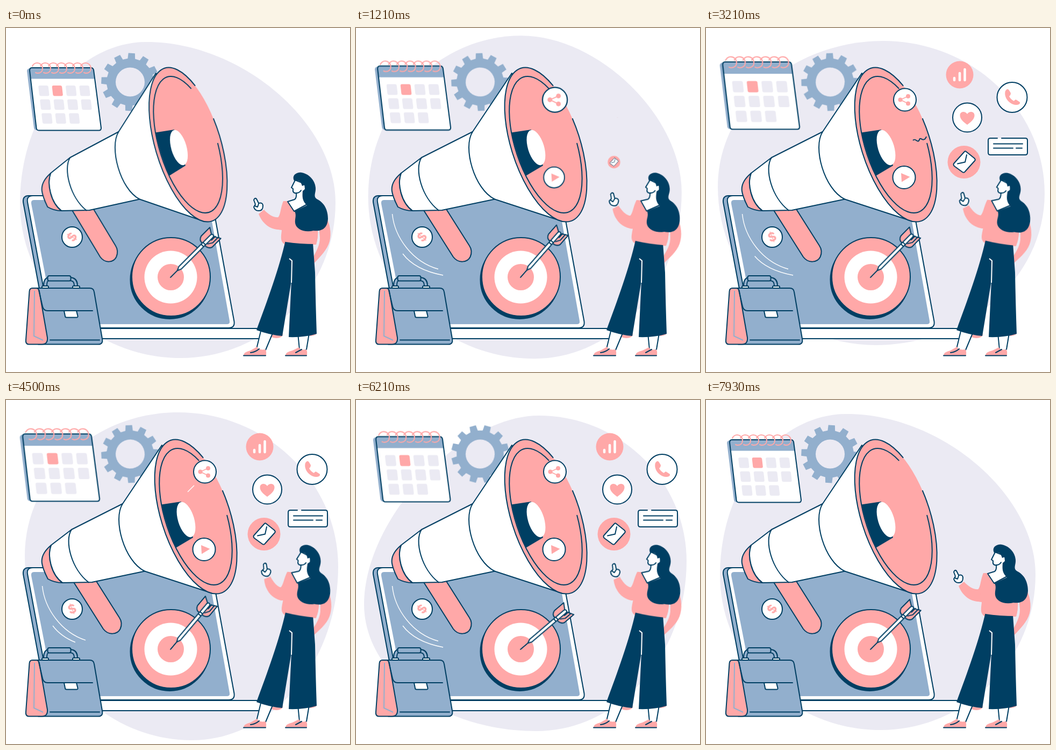
These frames come from a looping animation (640 px wide and 640 px high, 8 s). An HTML page:

```html
<!DOCTYPE html>
<html lang="en">
<head>
<meta charset="utf-8">
<title>Marketing campaign</title>
<style>
  html, body { margin: 0; width: 100%; height: 100%; overflow: hidden; background: #fff; }
  svg { display: block; width: 100%; height: 100%; }
  .n { stroke: #003f63; stroke-width: 2; stroke-linejoin: round; stroke-linecap: round; }
  .w { fill: #fff; } .p { fill: #ffa8a8; } .b { fill: #92afcd; } .d { fill: #003f63; }
  .l { fill: #ebeaf3; } .o { fill: none; }
  .anim, .pop, .dash { animation: 8s ease-in-out infinite both; }

  #calendar { transform-origin: 217px 219px; animation-name: grow; }
  @keyframes grow { 0%, 99%, 100% { transform: none; } 40%, 58% { transform: scale(1.075); } }

  #gear { transform-origin: 231px 100.5px; animation-name: spin; animation-timing-function: linear; }
  @keyframes spin { 99.1%, 100% { transform: rotate(360deg); } }

  #horn { transform-origin: 67px 0; animation-name: stretch; }
  @keyframes stretch { 0% { transform: scaleX(.95); } 16%, 100% { transform: none; } }

  #dart { transform-origin: 306px 464px; animation-name: sway; }
  @keyframes sway {
    0%, 100% { transform: none; }
    10.6% { transform: rotate(-5deg); }
    27% { transform: rotate(3.5deg); }
    54.5% { transform: rotate(-5deg); }
    78% { transform: rotate(4.6deg); }
  }

  #coin { transform-origin: 123px 389px; animation-name: roll; }
  @keyframes roll {
    0%, 100% { transform: rotate(-60deg); }
    40%, 56% { transform: rotate(-22deg); }
    78% { transform: rotate(-56deg); }
  }

  .lean { transform-origin: 545px 400px; animation-name: lean; }
  @keyframes lean { 0%, 4%, 97%, 100% { transform: none; } 20%, 80% { transform: rotate(5.4deg); } }

  #forearm { transform-origin: 505px 365px; animation-name: wave; }
  @keyframes wave {
    0%, 4%, 97%, 100% { transform: none; }
    20%, 78% { transform: rotate(9deg); }
    40% { transform: rotate(6deg); }
    56% { transform: rotate(11deg); }
  }

  .pop { transform-box: fill-box; transform-origin: center; animation-name: pop; animation-delay: var(--d); }
  @keyframes pop {
    0%, 11% { transform: scale(0); }
    15% { transform: scale(1.1); }
    17%, 84% { transform: none; }
    88%, 100% { transform: scale(0); }
  }

  .dash { fill: none; stroke-dasharray: 1 3; animation-timing-function: linear; stroke-linecap: butt; }
  .white { stroke: #fff; stroke-width: 1.4; }
  #glow1 { animation-name: glow1; }
  #glow2 { animation-name: glow2; }
  #spark { animation-name: spark; }
  #buzz { animation-name: buzz; }
  @keyframes glow1 {
    0%, 2% { stroke-dashoffset: 1; } 8%, 41% { stroke-dashoffset: 0; }
    47% { stroke-dashoffset: -1; } 47.01%, 50% { stroke-dashoffset: 1; }
    56.2% { stroke-dashoffset: .04; } 57%, 82% { stroke-dashoffset: 0; }
    92%, 100% { stroke-dashoffset: -1; }
  }
  @keyframes glow2 {
    0%, 3% { stroke-dashoffset: 1; } 8% { stroke-dashoffset: .15; }
    10%, 38% { stroke-dashoffset: 0; } 40.1% { stroke-dashoffset: -.06; }
    46% { stroke-dashoffset: -1; } 46.01%, 50% { stroke-dashoffset: 1; }
    56.2% { stroke-dashoffset: .4; } 61%, 82% { stroke-dashoffset: 0; }
    92%, 100% { stroke-dashoffset: -1; }
  }
  @keyframes spark {
    0%, 7% { stroke-dashoffset: 1; } 8% { stroke-dashoffset: .68; }
    10% { stroke-dashoffset: 0; } 12% { stroke-dashoffset: -1; }
    12.01%, 53% { stroke-dashoffset: 1; } 56%, 57% { stroke-dashoffset: 0; }
    60%, 100% { stroke-dashoffset: -1; }
  }
  @keyframes buzz {
    0%, 37% { stroke-dashoffset: 1; } 40%, 41% { stroke-dashoffset: 0; }
    44%, 100% { stroke-dashoffset: -1; }
  }
</style>
</head>
<body>
<svg viewBox="0 0 640 640">
  <path id="blob" class="l"/>

  <g id="calendar" class="anim">
    <path class="b" d="M44 75H158L171 190H57Q53 190 52 186L39 80Q39 76 44 75Z"/>
    <path class="w" d="M48 74H158Q162 74 163 78L177 186Q177 190.500 173 190.500H61Q57 190.500 56.500 186L44 79Q44 74 48 74Z"/>
    <path class="b" d="M48 74H158Q162 74 163 78L165 94.500H46L44 79Q44 74 48 74Z"/>
    <path class="n o" d="M48 74H158Q162 74 163 78L177 186Q177 190.500 173 190.500H61Q57 190.500 56.500 186L44 79Q44 74 48 74Z"/>
    <g id="days"></g>
    <g id="rings" fill="none" stroke="#ffa8a8" stroke-width="2" stroke-linecap="round"></g>
  </g>

  <g id="gear" class="anim"><path id="cog" class="b" fill-rule="evenodd"/></g>

  <g id="laptop">
    <path class="n b" d="M42 312H360L405 558H84Q76 558 74 550L32 324Q31 312 42 312Z"/>
    <path class="n w" d="M50 312H373Q381 312 383 320L424.500 546Q426 558 414 558H92Q84 558 82 550L40 324Q38 312 50 312Z"/>
    <path class="b" d="M52 320H371Q376 320 377 326L416 545Q417 551 411 551H96Q91 551 90 546L47 327Q46 320 52 320Z"/>
    <path class="n w" d="M165 559H482V578H165Z"/>
    <path id="glow1" class="dash white" pathLength="1" d="M67.500 346C72 390 105 435 153 448.500"/>
    <path id="glow2" class="dash white" pathLength="1" d="M87 420C102 440 125 453 162 460"/>
  </g>

  <circle class="n w" cx="123" cy="389" r="19"/>
  <g id="coin" class="anim">
    <text x="123" y="397" text-anchor="middle" font-family="Inter, Arial, sans-serif" font-size="23" font-weight="700" class="p">$</text>
  </g>

  <g id="target">
    <circle class="n d" cx="304.500" cy="468" r="73"/>
    <circle class="n p" cx="307" cy="463" r="73"/>
    <circle class="w" cx="306.500" cy="463.500" r="49"/>
    <circle class="p" cx="306.500" cy="463.500" r="24.500"/>
  </g>
  <g id="dart" class="anim">
    <g transform="translate(306 464) rotate(-45)" class="n">
      <path class="p" d="M87 -3C86 -9 90 -13 95 -14L117.500 -14L110 -2Z"/>
      <path class="p" d="M87 3C87 9 90 14 95 15L117.500 15L110 2Z"/>
      <path class="o" d="M93 5L101 10H115M103 5H113"/>
      <path class="o" d="M0 0H20"/>
      <path class="w" d="M18 0L25 -3.200H108Q112 -3 112 0T108 3.200H25Z"/>
      <path class="o" d="M84 -3V3M89 -3V3"/>
    </g>
  </g>

  <g id="horn" class="anim">
    <path class="n p" d="M124 336L181 426C190 438 207 437 212.500 426C216 418 215 411 211 405L166 334Z"/>
    <path class="n w" d="M105 340C84 325 76 290 84 270L122 241L217 193L290 84L373 356L258 318.500L160 339Z"/>
    <path class="n p" d="M84 270C71 281 65 292 67 304C69 316 74 325 78 333C87 338 95 340 105 340C84 325 76 290 84 270Z"/>
    <path class="n o" d="M122 241C108 262 122 315 154 339.500M217 193C198 222 220 300 258 318.500"/>
    <ellipse class="p" cx="353" cy="217" rx="63.700" ry="149.600" transform="rotate(-18.250 353 217)"/>
    <path class="n o" d="M402.900 168.900A63.700 149.600 -18.250 1 1 366.600 107.100M411.200 214.800A56.400 132.400 -18.250 1 1 358.600 112.400"/>
    <path class="d" d="M289 194.500L326 189L348 256L316 275Q300 240 289 194.500Z"/>
    <ellipse class="w" cx="335" cy="222.500" rx="15" ry="34" transform="rotate(-17 335 222.500)"/>
    <path id="spark" class="dash white" pathLength="1" d="M338 171L350 159"/>
    <path id="buzz" class="n dash" pathLength="1" d="M385 209C389 205 391 210 394 210.500C398 211 396 204 400 206C404 209 408 208 410 202"/>
  </g>

  <g id="briefcase">
    <path class="n o" style="stroke-width:8" d="M73 479C73 471 75 467 81 467M118 467C127 467 130 472 130 479"/>
    <path class="o" stroke="#92afcd" stroke-width="4" d="M73 481C73 471 75 467 81 467M118 467C127 467 130 472 130 481"/>
    <rect class="n b" x="77.500" y="461" width="43" height="9.500" rx="3"/>
    <rect class="n w" x="67" y="480" width="12" height="5" rx="1.500"/>
    <rect class="n w" x="124" y="480" width="13" height="5" rx="1.500"/>
    <path class="n b" d="M55 484H156Q163 484 164 491L179 578Q181 588.500 172 588.500H60Z"/>
    <path class="n p" d="M49 484H56Q61 484 62 490L77 576Q78 588.500 67 588.500H42Q36 588 37 580L43.500 490Q44 484 49 484Z"/>
    <path class="o" stroke="#92afcd" stroke-width="2" d="M53 489L52 573L69 581"/>
    <path class="n o" d="M61 488L68 518Q70 526 77 526H161M82 580.500H174"/>
    <path class="n w" d="M108 526H131L133.500 536Q134 538.500 131 538.500H113Q110 538.500 110 536Z"/>
  </g>

  <g class="pop" style="--d:0s">
    <circle class="n w" cx="370" cy="133.500" r="21"/>
    <path class="o" stroke="#ffa8a8" stroke-width="1.800" d="M376 127L361.500 133.500L376 140.500"/>
    <g class="p"><circle cx="361.500" cy="133.500" r="4"/><circle cx="376" cy="127" r="4"/><circle cx="376" cy="140.500" r="4"/></g>
  </g>
  <g class="pop" style="--d:.1s">
    <circle class="n w" cx="368.500" cy="278" r="21"/>
    <path class="p" d="M363 270L379.500 277L364 286.500Z"/>
  </g>
  <g class="pop" style="--d:.2s">
    <circle class="p" cx="480" cy="249.500" r="30.500"/>
    <path class="n w" d="M484 230L499 242Q502 245 500 247L482 267Q480 270 477 268L462 257Q459 254 462 251L480 231Q482 228 484 230Z"/>
    <path class="n o" d="M468 252.500L482 249.500L485 236"/>
  </g>
  <g class="pop" style="--d:.3s">
    <circle class="n w" cx="486" cy="166.500" r="27"/>
    <path class="p" d="M486 180C479 175 472 169 472.500 162C473 155 482 154 486 160C490 154 499 155 499.500 162C500 169 493 175 486 180Z"/>
  </g>
  <g class="pop" style="--d:.35s">
    <path class="n w" d="M550 205H594q4 0 4 4V232q0 4 -4 4H529q-4 0 -4 -4V209q0 -4 4 -4H542"/>
    <path class="n o" d="M535 215.500H589M535 223.500H571M577 223.500H588"/>
  </g>
  <g class="pop" style="--d:.4s">
    <circle class="p" cx="472" cy="87" r="25.500"/>
    <path class="o" stroke="#fff" stroke-width="4.500" stroke-linecap="round" d="M462 93V97M472 84V97M481.500 77V97"/>
  </g>
  <g class="pop" style="--d:.73s">
    <circle class="n w" cx="569.500" cy="129" r="28"/>
    <path class="p" d="M557 117Q561 111 564 116L567 121Q567 125 564 127Q567 133 573 136Q575 132 578 134L584 138Q585 142 579 143C566 144 553 130 557 117Z"/>
  </g>

  <g id="woman">
    <g class="p"><ellipse cx="503" cy="570" rx="12" ry="7"/><ellipse cx="566" cy="567" rx="12" ry="6"/></g>
    <path class="n w" d="M475 560L466 597Q474 604 483 599L496 568Z"/>
    <path class="n w" d="M543 568L546 598Q553 603 559 598L564 568Z"/>
    <g id="shoe">
      <path class="p" d="M442 609Q442 603 455 600L467 593Q469 600 483 598Q485 603 484 609Z"/>
      <path class="n o" d="M442 609.500H483M455 604Q464 603 471 597"/>
    </g>
    <g transform="translate(78)">
      <path class="p" d="M442 609Q442 603 455 600L467 594Q469 600 481 598Q483 603 482 609Z"/>
      <path class="n o" d="M442 609.500H481M461 604L472 598"/>
    </g>
    <g class="anim lean">
      <path class="p" d="M594 348C603 364 606 382 602 397C598 412 585 425 574 437L570 430C577 415 584 405 584 390L582 368Z"/>
      <path class="p" d="M516 322H525L537 341L575 352C581 368 582 385 577 403H520C509 398 512 388 513 376L502 374L505 353C511 350 510 336 516 322Z"/>
    </g>
    <path class="d" d="M520 395L571 400L575 455Q576 510 578 569Q555 576 526 575L531 470L514 573Q490 571 466 562C486 508 509 445 520 395Z"/>
    <path class="o" stroke="#fff" stroke-width="2" d="M527 429L532 433L531 474"/>
    <g class="anim lean">
      <path class="p" d="M514 374H580Q581 390 577 402Q545 402 520 398Q510 394 514 374Z"/>
      <path class="n w" d="M538 283L531 297L534 299V304Q536 308 540 307Q541 316 537 319L524 323L536 341L560 328L556 290Z"/>
      <path class="d" d="M536 284C531 273 542 268 550 269C563 271 575 283 576 297C577 306 571 313 578 318C593 325 599 340 599 355C598 373 587 379 572 377C556 381 540 375 538 363C537 354 541 349 537 341L560 330C551 322 551 314 552 303Q557 300 557 296Q556 290 551 294C549 287 546 283 541 284Z"/>
      <path class="n o" d="M540 307Q546 307 549 302"/>
      <g id="forearm" class="anim">
        <path class="p" d="M509 352C499 354 488 347 480 338L470 346C476 362 491 377 513 375Z"/>
        <path class="n w" d="M461 320Q463 315 466 318L470 326Q478 324 478 331Q478 340 470 340Q463 340 461 333L464 328Z"/>
        <path class="n o" d="M463 331L468 333L470 327"/>
      </g>
    </g>
  </g>
</svg>
<script>
  const LOOP = 8000;
  const byId = id => document.getElementById(id);
  const times = (n, fn) => Array.from({ length: n }, (_, i) => fn(i)).join('');

  byId('days').innerHTML = times(11, i => {
    const row = i >> 2, x = 60 + 25.4 * (i % 4) + 3 * row, y = 107 + 25.7 * row;
    return `<rect class="${i === 1 ? 'p' : 'l'}" width="18.5" height="19.5" rx="3"
      transform="translate(${x} ${y}) skewX(6.4)"/>`;
  });

  byId('rings').innerHTML = times(7, i =>
    `<path d="M${49 + 15 * i} 71c2-4 6-6 9-6 5 0 10 4 10 10s-4 9-9 9q-2 0-4-1"/>`);

  // Twelve teeth around a ring
  const polar = (r, deg) => {
    const a = deg * Math.PI / 180;
    return `${(231 + r * Math.cos(a)).toFixed(1)} ${(100.5 + r * Math.sin(a)).toFixed(1)}`;
  };
  byId('cog').setAttribute('d', 'M' + times(12, i => {
    const a = -87 + 30 * i;
    return `${i ? 'L' : ''}${polar(44, a - 9)}L${polar(54, a - 6.5)}L${polar(54, a + 6.5)}L${polar(44, a + 9)}`;
  }) + 'ZM204 100.5a27 27 0 1 0 54 0a27 27 0 1 0-54 0Z');

  // time, then top, right, bottom and left points, then roundness of the two upper corners
  const rest = [262, 26, 613, 325, 325, 614, 26, 325, .5, .55];
  const shapes = [
    [0, ...rest],
    [640, 303, 5, 601, 340, 325, 617, 20, 300, .43, .55],
    [1930, 313, 26, 612, 262, 340, 613, 26, 330, .55, .55],
    [2600, 335, 25, 635, 290, 330, 600, 25, 310, .55, .55],
    [3210, 330, 24, 630, 308, 315, 590, 22, 295, .55, .55],
    [4500, 320, 23, 618, 310, 345, 633, 35, 290, .55, .55],
    [4900, 325, 25, 615, 305, 346, 636, 30, 310, .55, .53],
    [6210, 340, 29, 615, 300, 335, 616, 15, 380, .55, .45],
    [6900, 320, 36, 606, 310, 322, 617, 4, 370, .52, .48],
    [7930, ...rest],
    [LOOP, ...rest]
  ];

  function blobPath(t) {
    const i = shapes.findIndex(s => s[0] > t);
    const a = shapes[i - 1], b = shapes[i], f = (t - a[0]) / (b[0] - a[0]);
    const [tx, ty, rx, ry, bx, by, lx, ly, kr, kl] = a.slice(1).map((v, j) => v + (b[j + 1] - v) * f);
    const k = .55;
    return `M${tx} ${ty}C${tx + kr * (rx - tx)} ${ty} ${rx} ${ry - kr * (ry - ty)} ${rx} ${ry}` +
      `C${rx} ${ry + k * (by - ry)} ${bx + k * (rx - bx)} ${by} ${bx} ${by}` +
      `C${bx - k * (bx - lx)} ${by} ${lx} ${ly + k * (by - ly)} ${lx} ${ly}` +
      `C${lx} ${ly - kl * (ly - ty)} ${tx - kl * (tx - lx)} ${ty} ${tx} ${ty}Z`;
  }

  const blob = byId('blob');
  let start;
  function draw(now) {
    start ??= now;
    blob.setAttribute('d', blobPath((now - start) % LOOP));
    requestAnimationFrame(draw);
  }
  blob.setAttribute('d', blobPath(0));
  requestAnimationFrame(draw);
</script>
</body>
</html>
```
